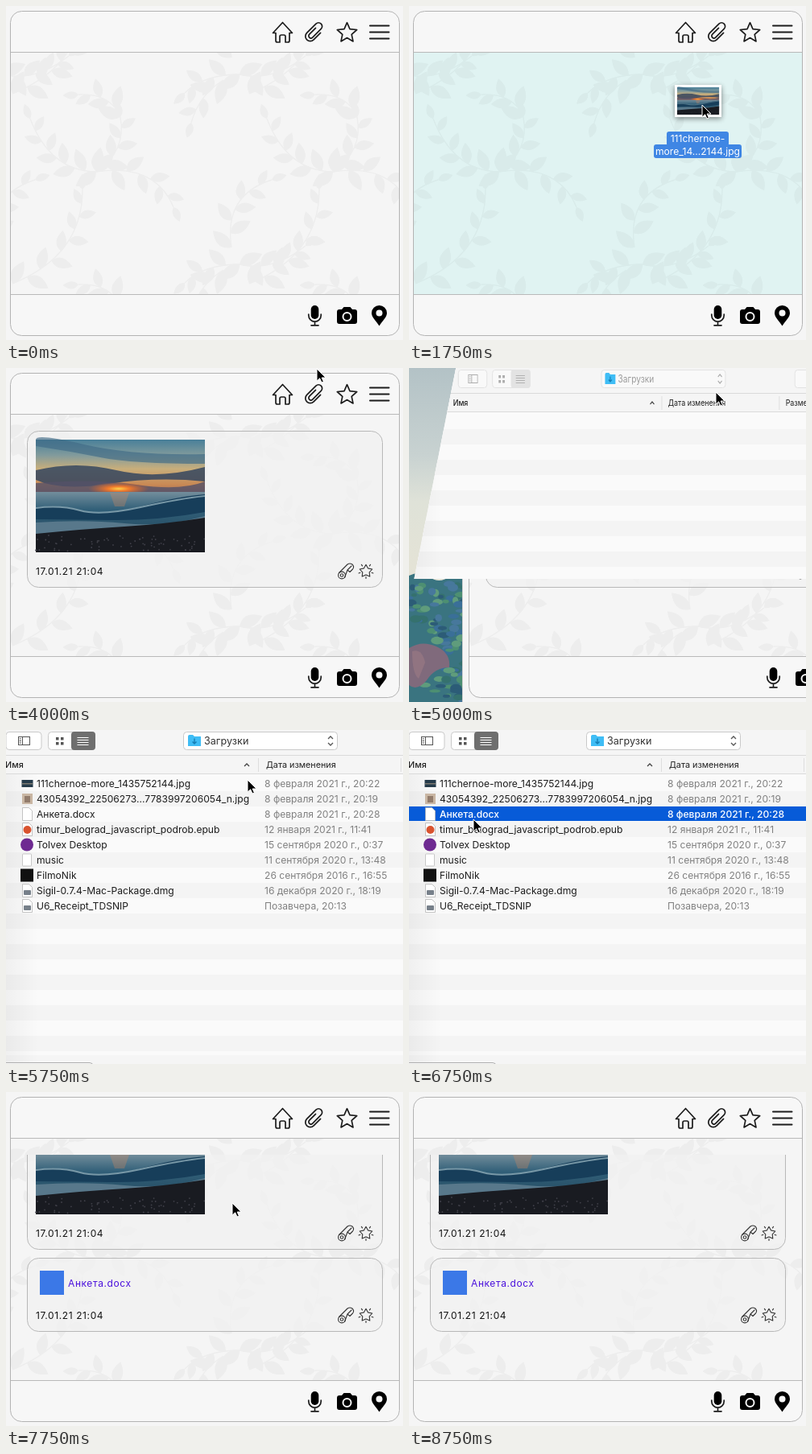
These frames come from a looping animation (493 px wide and 415 px high, 9.75 s). An HTML page:

```html
<!DOCTYPE html>
<html lang="ru">
<head>
<meta charset="utf-8">
<title>Chat file upload</title>
<style>
html, body { margin: 0; width: 100%; height: 100%; overflow: hidden; background: #f5f5f5; }
svg { display: block; width: 100%; height: 100%; font-family: Inter, "Open Sans", sans-serif; }
.line { fill: none; stroke: #1c1c1c; stroke-width: 1.7; stroke-linecap: round; stroke-linejoin: round; }
.thin { fill: none; stroke: #333; stroke-width: 1.1; stroke-linecap: round; stroke-linejoin: round; }
.ui { font-size: 12.1px; }
.head { font-size: 10.8px; fill: #222; }
.stamp { font-size: 12px; letter-spacing: .6px; }
</style>
</head>
<body>
<svg id="stage" viewBox="0 0 493 415"></svg>
<script>
const LOOP = 9750, STEP = 250;
const AXIS = 316, HALF = 323, DOCKED = 69;

let seed = 7;
const rnd = () => (seed = seed * 16807 % 2147483647) / 2147483647;
const rect = (x, y, w, h, fill, extra = '') =>
  `<rect x="${x}" y="${y}" width="${w}" height="${h}" fill="${fill}" ${extra}/>`;
const path = (d, extra = '') => `<path d="${d}" ${extra}/>`;
const circle = (x, y, r, fill, extra = '') => `<circle cx="${x}" cy="${y}" r="${r}" fill="${fill}" ${extra}/>`;
const text = (x, y, s, extra = '') => `<text x="${x}" y="${y}" ${extra}>${s}</text>`;
const group = (s, extra = '') => `<g ${extra}>${s}</g>`;
const repeat = (n, f) => Array.from({ length: n }, (_, i) => f(i)).join('');

function star(cx, cy, outer, inner) {
  const pts = [];
  for (let i = 0; i < 10; i++) {
    const r = i % 2 ? inner : outer, a = i * Math.PI / 5 - Math.PI / 2;
    pts.push((cx + r * Math.cos(a)).toFixed(1) + ' ' + (cy + r * Math.sin(a)).toFixed(1));
  }
  return 'M' + pts.join('L') + 'Z';
}

// Leaves alternate along a quadratic stem.
function branch(x0, y0, cx, cy, x1, y1, n) {
  const leaf = i => {
    const t = i / (n - 1), u = 1 - t;
    const x = u * u * x0 + 2 * u * t * cx + t * t * x1;
    const y = u * u * y0 + 2 * u * t * cy + t * t * y1;
    const dir = Math.atan2(u * (cy - y0) + t * (y1 - cy), u * (cx - x0) + t * (x1 - cx)) * 180 / Math.PI;
    const turn = i === n - 1 ? 0 : (i % 2 ? 48 : -48) + rnd() * 14;
    return path('M0 0Q9 -12 23 0Q9 10 0 0',
      `transform="translate(${x} ${y}) rotate(${dir + turn}) scale(${1.35 - t * .5})"`);
  };
  return path(`M${x0} ${y0}Q${cx} ${cy} ${x1} ${y1}`, 'fill="none" stroke="#000" stroke-width="1.4"') + repeat(n, leaf);
}

function foliage() {
  const tile = branch(112, 206, 55, 205, 30, 140, 9) + branch(112, 206, 150, 180, 142, 138, 7) +
    branch(112, 206, 185, 195, 208, 250, 8) + branch(142, 138, 130, 108, 90, 110, 6) +
    branch(8, 345, 95, 310, 95, 228, 10) + branch(290, 85, 330, 95, 372, 62, 7) +
    branch(290, 85, 245, 85, 222, 108, 6) + branch(270, 92, 240, 110, 230, 145, 5) +
    branch(280, 300, 270, 235, 330, 216, 8) + circle(111, 194, 5, '#000');
  return `<g id="tile">${tile}</g>` +
    [[294, 0], [-294, 0], [0, 236], [294, 236], [0, -236], [294, -236]]
      .map(([x, y]) => `<use href="#tile" x="${x}" y="${y}"/>`).join('');
}

function seaPhoto() {
  return rect(0, 0, 210, 140, 'url(#sky)') +
    path('M0 8Q40 14 80 22T210 30V18Q120 20 60 6T0 0Z', 'fill="#3f6a86" opacity=".65"') +
    path('M0 38Q50 26 100 38T210 34V52Q150 46 90 55T0 50Z', 'fill="#354760" opacity=".85"') +
    path('M0 54Q70 48 125 56T210 52V65H0Z', 'fill="#545268" opacity=".8"') +
    `<ellipse cx="103" cy="61" rx="38" ry="8" fill="url(#glow)"/>` +
    rect(0, 65, 210, 55, 'url(#sea)') +
    path('M92 66H116L110 83H98Z', 'fill="#dc8b5d" opacity=".3"') +
    path('M0 84Q30 80 55 88T130 83T210 68V90Q150 101 90 100T0 99Z', 'fill="#173e5a"') +
    path('M0 85Q30 81 55 88T130 84T210 70', 'fill="none" stroke="#7898a7" stroke-width="2"') +
    path('M0 103Q60 99 110 104T210 95V108Q110 114 0 119Z', 'fill="#58788b"') +
    path('M0 117Q60 111 110 108T210 97V140H0Z', 'fill="#191b21"') +
    repeat(70, () => circle((rnd() * 210).toFixed(1), (119 + rnd() * 20).toFixed(1), .9, '#41414a'));
}

function desktop() {
  const tones = ['#35716e', '#4d8f72', '#3a6f98', '#2c5c77', '#5f9c7c', '#47789c'];
  return rect(0, 0, 120, 415, 'url(#haze)') +
    path('M0 258Q14 251 26 260T52 258T120 266V415H0Z', 'fill="#3a7480"') +
    repeat(110, i => `<ellipse cx="${(rnd() * 80).toFixed(1)}" cy="${(266 + rnd() * 149).toFixed(1)}" rx="${(3 + rnd() * 5).toFixed(1)}" ry="${(2 + rnd() * 3).toFixed(1)}" fill="${tones[i % 6]}"/>`) +
    path('M0 348Q16 338 34 346Q52 354 50 372Q32 372 22 388Q10 402 0 394Z', 'fill="#806a7c"') +
    path('M4 352Q16 348 20 366L12 386Q4 380 4 352Z', 'fill="#9c7c86" opacity=".6"');
}

function toolbarIcons() {
  return group(
    path('M331.5 33.5L343.5 20.5L355.5 33.5H352V43q0 2-2 2H347V38q0-2-2-2H342q-2 0-2 2V45H337q-2 0-2-2V33.5Z') +
    path('M6-4V8a6 6 0 0 1-12 0V-8a4.5 4.5 0 0 1 9 0V7a2.8 2.8 0 0 1-5.6 0V-4', 'transform="translate(383.5 32) rotate(45)"') +
    path(star(423.5, 33.5, 12.8, 6)) +
    path('M452 24.5H475.5M452 32.5H475.5M452 40.5H475.5', 'stroke-width="2"'), 'class="line"') +
    rect(378.7, 372, 9.6, 17, '#000', 'rx="4.8"') +
    path('M375.8 383v1.5a7.7 7.7 0 0 0 15.4 0V383M383.5 392.5V396.5M379 396.8H388', 'class="line"') +
    path('M414 377H417L419.5 374H427.5L430 377H433q3 0 3 3V392q0 3-3 3H414q-3 0-3-3V380q0-3 3-3Z') +
    circle(423.5, 386, 5, 'none', 'stroke="#f7f7f7" stroke-width="2"') +
    path('M463.5 397.5C459 390.5 454 386.5 454 381.5a9.5 9.5 0 0 1 19 0C473 386.5 468 390.5 463.5 397.5Z') +
    circle(463.5, 381.5, 4, '#f7f7f7');
}

// Time stamp and action icons along the foot of a card.
function cardFoot(y) {
  const ray = i => {
    const a = (i * 36 - 90) * Math.PI / 180, c = Math.cos(a), s = Math.sin(a);
    return i % 2 ? `M${447 + 7.5 * c} ${y + 7.5 * s}L${447 + 9.5 * c} ${y + 9.5 * s}` : '';
  };
  return text(37, y + 4.5, '17.01.21 21:04', 'class="stamp" fill="#111"') +
    group(circle(417, y + 5.5, 4.4, 'none') + circle(417, y + 5.5, 1.8, 'none') +
      path(`M413.5 ${y + 2.5}L424 ${y - 8}Q427 ${y - 10} 430 ${y - 8}Q433 ${y - 5} 430.5 ${y - 2}L427 ${y + 1.5}L424 ${y - 1}L420.5 ${y + 8.5}M424 ${y - 1}L429 ${y - 6}`) +
      path(star(447, y + .5, 8.2, 4.4)) + path(repeat(10, ray)), 'class="thin"');
}

function card(y, h, body) {
  return rect(26.5, y + .5, 441, h, '#f2f2f2', 'fill-opacity=".72" stroke="#b8b8b8" rx="14"') + body;
}

function page() {
  return rect(-3, 0, 620, 415, '#f5f5f5') + rect(-3, 0, 1, 415, '#cfcfcf') +
    rect(5.5, 6.5, 483, 403, '#f7f7f7', 'rx="14"') +
    group(rect(6, 58, 482, 300, '#f5f5f5', 'id="board"') + group(foliage(), 'opacity=".035"'), 'clip-path="url(#boardClip)"') +
    path('M6 57.5H488M6 358.5H488', 'stroke="#b9b9b9"') +
    rect(5.5, 6.5, 483, 403, 'none', 'rx="14" stroke="#b3b3b3"') + toolbarIcons() +
    group(group(
      card(78, 194, '<use href="#sea-photo" x="37" y="89"/>' + cardFoot(252)) +
      group(card(283, 91, rect(42, 299, 30, 30, '#3b78e7') +
        text(77, 319, 'Анкета.docx', 'class="stamp" fill="#4a10dc"') + cardFoot(354)), 'id="docCard"'),
      'id="cards"'), 'clip-path="url(#chatClip)"');
}

function dragged() {
  return rect(-34, -25, 58, 40, '#fff', 'filter="url(#soft)"') +
    '<use href="#sea-photo" transform="translate(-31 -22) scale(.248 .243)"/>' +
    rect(-44, 33, 77, 18, '#3f86e4', 'rx="3"') + rect(-60, 49, 109, 17, '#3f86e4', 'rx="3"') +
    group(text(-5.5, 46, '111chernoe-') + text(-5.5, 62, 'more_14...2144.jpg'),
      'class="ui" fill="#fff" text-anchor="middle"');
}

const leafIcon = (x, y) => path(`M${x} ${y}h8l4 4v12h-12Z`, 'fill="#fff" stroke="#b5b5b5" stroke-width=".8"');
const files = [
  ['111chernoe-more_1435752144.jpg', '8 февраля 2021 г., 20:22', rect(19.5, 62, 14, 9, '#263b4a') + rect(20, 66, 13, 1.5, '#7d7a72')],
  ['43054392_22506273...7783997206054_n.jpg', '8 февраля 2021 г., 20:19', rect(20, 79, 13, 13, '#c9b6a3') + rect(23, 82, 7, 8, '#927c6c')],
  ['Анкета.docx', '8 февраля 2021 г., 20:28', leafIcon(20.5, 96.5)],
  ['timur_belograd_javascript_podrob.epub', '12 января 2021 г., 11:41', leafIcon(20.5, 115.5) + circle(26.5, 124, 5, '#d9532f')],
  ['Tolvex Desktop', '15 сентября 2020 г., 0:37', circle(26, 142.5, 8, '#6e2a91')],
  ['music', '11 сентября 2020 г., 13:48', rect(20.5, 154, 11, 15, '#fff', 'stroke="#bbb" stroke-width=".8" rx="1"')],
  ['FilmoNik', '26 сентября 2016 г., 16:55', rect(18, 172.5, 16, 16, '#111')],
  ['Sigil-0.7.4-Mac-Package.dmg', '16 декабря 2020 г., 18:19', leafIcon(20.5, 191.5) + rect(22, 199, 9, 6, '#77808a', 'rx="1"')],
  ['U6_Receipt_TDSNIP', 'Позавчера, 20:13', leafIcon(20.5, 210.5) + rect(22, 218, 9, 6, '#77808a', 'rx="1"')]
];

const row = (y, s, extra = '') => group(s, `data-y="${y}" ${extra}`);

function dialogTools() {
  const button = (x, w) => rect(x, 2.5, w, 22, '#fff', 'rx="4" stroke="#c9c9c9"');
  return button(0, 44) + rect(15.5, 8.5, 14, 10, 'none', 'stroke="#555"') +
    path('M20.5 8.5V18.5M16.5 11H19M16.5 13.5H19M16.5 16H19', 'stroke="#555" fill="none"') +
    button(52.5, 58) + rect(81, 2, 30, 23, '#6f6f6f', 'rx="4" id="toggle"') +
    repeat(4, i => rect(62 + i % 2 * 6, 9 + (i >> 1) * 6, 3.5, 3.5, '#555')) +
    path('M88.5 9.5H102.5M88.5 12.5H102.5M88.5 15.5H102.5M88.5 18.5H102.5', 'id="bars"') +
    button(220.5, 191) + text(246, 18, 'Загрузки', 'style="font-size:12.6px" fill="#333"') +
    path('M400 11L403 8L406 11M400 16L403 19L406 16', 'fill="none" stroke="#555" stroke-width="1.3"') +
    button(518.5, 110);
}

const folder = () => path('M226 8q0-2 2-2h4l2 2h8v12h-16Z', 'fill="#3fbdf5"') +
  path('M234 10.5V16.5M231.5 14.5L234 17L236.5 14.5', 'fill="none" stroke="#167fb5" stroke-width="1.4"');

function dialog() {
  const header = text(-1, 47, 'Имя', 'class="head" font-weight="500"') +
    path('M296 45L299 42L302 45', 'fill="none" stroke="#444" stroke-width="1.3"') +
    text(323, 47, 'Дата изменения', 'class="head"') + text(500, 47, 'Размер', 'class="head"') +
    path('M313.5 35V52M490.5 35V52', 'stroke="#ddd"');
  const list = files.map(([name, date, icon], i) => {
    const y = 57 + i * 19, chosen = i === 2;
    const ink = color => chosen ? `class="pickText" data-ink="${color}"` : `fill="${color}"`;
    return row(y + 9, (chosen ? rect(-10, y, 660, 18, '#075bd8', 'id="pick"') : '') + icon +
      text(38, y + 13.6, name, ink('#1c1c1c')) + text(321, y + 13.6, date, ink('#808080')));
  }).join('');
  return `<polygon id="shade" fill="#f5f5f5"/>` +
    group(rect(-60, 0, 760, 450, '#fafafa') + rect(-60, 0, 760, 55, '#f5f5f5') +
      repeat(9, i => rect(-60, 76 + i * 38, 760, 19, '#f4f4f4')) +
      rect(-60, 404, 760, 46, '#f5f5f5') + rect(-10, 55, 50, 395, 'url(#dusk)') +
      path('M-60 31.5H700M-60 54.5H700', 'stroke="#dadada"') +
      row(13, dialogTools(), 'id="tools"') + row(13, folder()) + row(43, header) +
      group(list, 'id="list" class="ui"') +
      row(424, rect(-20, 413.5, 128, 22, '#fff', 'rx="4" stroke="#aaa"') + rect(536, 413, 74, 22, '#075bd8', 'rx="4"')),
      'clip-path="url(#sheetClip)"');
}

const gradient = (id, stops, axis = 'x2="0" y2="1"') => `<linearGradient id="${id}" ${axis}>` +
  stops.map(([o, c]) => `<stop offset="${o}" stop-color="${c}"/>`).join('') + '</linearGradient>';

document.getElementById('stage').innerHTML = `<defs>
  ${gradient('sky', [[0, '#487f99'], [.14, '#829b9c'], [.26, '#c8ae7b'], [.4, '#c98954'], [.5, '#8b6265']])}
  ${gradient('sea', [[0, '#738e9c'], [.4, '#315f78'], [1, '#244a60']])}
  ${gradient('haze', [[0, '#b3c2c6'], [.26, '#c8d2d1'], [.4, '#dfe2d8'], [.6, '#e4e3d6'], [1, '#d8d8cc']])}
  ${gradient('dusk', [[0, '#0000000d'], [1, '#00000000']], '')}
  <radialGradient id="glow"><stop stop-color="#ffd24a"/><stop offset=".35" stop-color="#f07a2c"/><stop offset="1" stop-color="#d8622c" stop-opacity="0"/></radialGradient>
  <filter id="soft" x="-20%" y="-20%" width="140%" height="150%"><feDropShadow dx="0" dy="2" stdDeviation="3" flood-opacity=".45"/></filter>
  <clipPath id="boardClip">${rect(6, 58, 482, 300, '#000')}</clipPath>
  <clipPath id="chatClip">${rect(20, 78, 455, 280, '#000')}</clipPath>
  <clipPath id="sheetClip"><polygon id="outline"/></clipPath>
  <g id="sea-photo">${seaPhoto()}</g></defs>` +
  desktop() + group(page(), 'id="page"') + group(dialog(), 'id="dialog"') + group(dragged(), 'id="drag"') +
  path('M0 0V15.2L3.6 11.8L6 17L8.4 16L6.1 11H11Z', 'id="cursor" stroke="#fff" stroke-width="1"');

const el = Object.fromEntries(['page', 'board', 'cards', 'docCard', 'dialog', 'drag', 'cursor',
  'outline', 'shade', 'tools', 'toggle', 'bars', 'list', 'pick'].map(id => [id, document.getElementById(id)]));
const rows = [...document.querySelectorAll('[data-y]')];
const pickText = [...document.querySelectorAll('.pickText')];
const show = (node, on) => node.setAttribute('display', on ? 'inline' : 'none');
const move = (node, x, y) => node.setAttribute('transform', `translate(${x} ${y})`);

// Each track holds its last value until the next time.
const pointer = [[1750, 364, 123], [2000, 336, 139], [2250, 309, 153], [2500, 307, 153], [2750, 312, 142],
  [3000, 332, 95], [3250, 351, 51], [3750, 372, 24], [4000, 386, 1], [4250, 381, 30],
  [5500, 345, 48], [5750, 300, 62], [6000, 235, 82], [6250, 140, 102], [6500, 80, 111],
  [7500, 180, 124], [7750, 281, 138], [8250, 372, 212], [8500, 454, 279]];
const windowX = [[0, 0], [4750, 42], [5000, DOCKED], [7250, 25], [7500, 0]];
// time, bottom, top scale, slide, opacity
const sheetTrack = [[5000, 262, .798, 0, 1], [5250, 447, 1, 0, 1], [7000, 447, 1, 130, .8], [7250, 447, 1, 320, .22]];
const at = (track, t) => track.reduce((found, key) => key[0] <= t ? key : found, null);

function drawSheet(t, shift) {
  const key = at(sheetTrack, t);
  const open = key && t < 7500;
  show(el.dialog, open);
  if (!open) return;
  const [, bottom, top, slide, alpha] = key;
  const settled = top === 1;
  const scale = y => settled ? 1 : top + y * .000613;
  const a = HALF * scale(0), b = HALF * scale(bottom);
  const points = `${AXIS - a},0 ${AXIS + a},0 ${AXIS + b},${bottom} ${AXIS - b},${bottom}`;
  el.outline.setAttribute('points', points);
  el.shade.setAttribute('points', points);
  el.shade.setAttribute('filter', settled ? 'url(#soft)' : 'none');
  rows.forEach(r => {
    const s = scale(+r.dataset.y);
    r.setAttribute('transform', `translate(${AXIS * (1 - s)} 0) scale(${s} 1)`);
  });
  move(el.dialog, shift - DOCKED, -slide);
  el.dialog.setAttribute('opacity', alpha);
  el.tools.setAttribute('opacity', settled ? 1 : .45);
  el.toggle.setAttribute('fill', settled ? '#6f6f6f' : '#cfcfcf');
  el.bars.setAttribute('stroke', settled ? '#fff' : '#555');
  show(el.list, t >= 5500);
  const picked = t >= 6750;
  show(el.pick, picked);
  pickText.forEach(n => {
    n.setAttribute('fill', picked ? '#fff' : n.dataset.ink);
    n.setAttribute('font-weight', picked ? 500 : 400);
  });
}

function draw(time) {
  const t = Math.floor(time % LOOP / STEP) * STEP;
  const shift = at(windowX, t)[1];
  const dragging = t >= 1750 && t < 2500;
  move(el.page, shift, 0);
  el.board.setAttribute('fill', dragging ? '#e0f3f2' : '#f5f5f5');
  show(el.cards, t >= 3000);
  show(el.docCard, t >= 7750);
  move(el.cards, 0, t >= 7750 ? -77 : 0);
  drawSheet(t, shift);
  const tip = at(pointer, t);
  show(el.cursor, tip && t < 8750);
  show(el.drag, dragging);
  if (tip) {
    move(el.cursor, tip[1], tip[2]);
    move(el.drag, tip[1], tip[2]);
  }
}

const start = performance.now();
function frame() {
  draw(performance.now() - start);
  requestAnimationFrame(frame);
}
frame();
</script>
</body>
</html>
```
